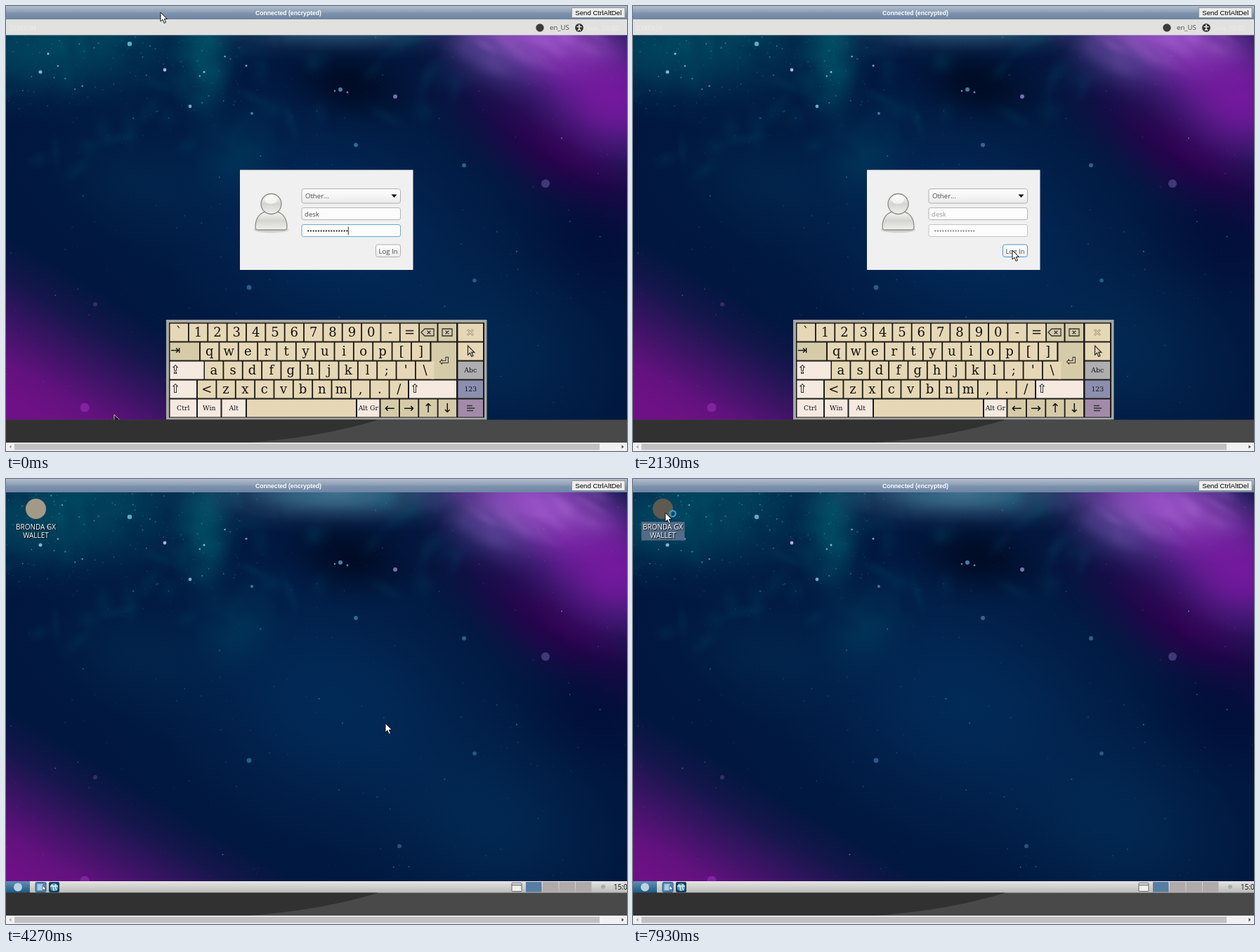
These frames come from a looping animation (884x634 px, 8 s). An HTML page with a canvas:

```html
<!DOCTYPE html>
<html lang="en">
<head>
<meta charset="utf-8">
<title>Remote desktop login</title>
<style>
  html, body { margin: 0; width: 100%; height: 100%; overflow: hidden; background: #313131; }
  canvas, svg { position: absolute; left: 0; top: 0; }
  text { font-family: "Open Sans", "Noto Sans", sans-serif; font-size: 9.6px; fill: #4a4a4a; white-space: pre; }
  .arial { font-family: "Liberation Sans", Arial, sans-serif; }
  .key { font-family: "DejaVu Serif", serif; text-anchor: middle; fill: #111; }
  .sym { font-family: "DejaVu Sans", sans-serif; }
  .label { font-size: 10px; fill: #fff; text-anchor: middle; text-shadow: 1px 1px 1px #000; }
  .mid { text-anchor: middle; }
</style>
</head>
<body>
<canvas id="sky" width="884" height="634"></canvas>
<svg id="stage" width="884" height="634" viewBox="0 0 884 634"></svg>
<script>
// Wallpaper
const g = document.getElementById('sky').getContext('2d');
let seed = 11;
const rnd = () => (seed = (seed * 16807) % 2147483647) / 2147483647;

function blob(x, y, rx, ry, turn, rgb, alpha) {
  g.save();
  g.translate(x, y);
  g.rotate(turn);
  g.scale(rx, ry);
  const fade = g.createRadialGradient(0, 0, 0, 0, 0, 1);
  [1, .8, .42, .12, 0].forEach((k, i) => fade.addColorStop(i / 4, `rgba(${rgb},${alpha * k})`));
  g.fillStyle = fade;
  g.fillRect(-1, -1, 2, 2);
  g.restore();
}

function dot(x, y, r, color) {
  g.fillStyle = color;
  g.beginPath();
  g.arc(x, y, r, 0, 7);
  g.fill();
}

function paintSky() {
  g.fillStyle = '#01173f';
  g.fillRect(0, 0, 884, 634);
  blob(470, 320, 380, 270, .4, '2,46,92', .85);
  blob(690, 490, 260, 190, .4, '2,46,88', .7);
  blob(190, 250, 190, 120, .3, '2,42,80', .6);
  blob(110, 30, 260, 150, 0, '0,84,104', .75);
  blob(20, 70, 160, 90, 0, '0,88,108', .4);
  blob(285, 70, 55, 130, 0, '0,100,116', .65);
  blob(330, 210, 80, 100, .6, '0,74,104', .4);
  blob(470, 20, 260, 60, 0, '90,150,175', .7);
  blob(490, 112, 130, 75, .2, '0,10,34', .9);
  blob(790, 215, 280, 95, .6, '44,0,78', .95);
  blob(840, 330, 150, 110, .6, '0,12,56', .7);
  blob(800, 85, 290, 130, .6, '112,30,158', .95);
  blob(870, 130, 130, 130, .6, '122,24,162', .85);
  blob(750, 30, 190, 85, .2, '166,92,212', .8);
  blob(690, 75, 110, 60, .3, '96,88,168', .45);

  const glow = g.createLinearGradient(200, 445, 100, 615);
  [[0, 0], [.25, .18], [.5, .5], [.8, .9], [1, 1]].forEach(([at, a]) =>
    glow.addColorStop(at, `rgba(110,17,134,${a})`));
  g.fillStyle = glow;
  g.fillRect(0, 300, 884, 334);

  // soft mottling of the clouds
  for (let i = 0; i < 90; i++) {
    const x = rnd() * 640, y = 20 + rnd() * 240 * (1 - x / 1300);
    blob(x, y, 15 + rnd() * 30, 10 + rnd() * 18, rnd() * 3, rnd() < .5 ? '0,110,130' : '0,16,52', .11);
  }
  for (let i = 0; i < 30; i++)
    blob(640 + rnd() * 210, 20 + rnd() * 65, 20 + rnd() * 30, 8 + rnd() * 15, .5, '190,130,225', .09);

  // star dust: dense and bright at the upper left, thin elsewhere
  for (let i = 0; i < 1000; i++) {
    const near = i < 330;
    const x = near ? rnd() * 340 : rnd() * 884;
    const y = near ? 20 + rnd() ** 1.4 * 140 : 20 + rnd() * 570;
    const a = near ? .15 + rnd() ** 3 * .7 : .08 + rnd() ** 3 * .4;
    dot(x, y, .35 + rnd() ** 4 * (near ? 1 : .8), `rgba(125,195,220,${a})`);
  }
  [[176, 54, 3.2, '#5badc0'], [226, 91, 2.4, '#b5aede'], [49, 94, 2.5, '#79b7cf'], [262, 143, 2.4, '#6fa9c6'],
   [350, 153, 2, '#417da0'], [476, 119, 3, '#427fa2'], [468, 121, 1.3, '#5c8dad'], [486, 123, 1.4, '#5c8dad'],
   [554, 129, 3, '#766fae'], [498, 198, 3, '#2d6990'], [768, 253, 6, '#403878'], [652, 227, 3, '#2a618a'],
   [667, 391, 2.8, '#245e88'], [346, 401, 3.4, '#245f88'], [560, 523, 3, '#1d5680'], [127, 425, 3, '#3e2a68'],
   [112, 572, 6.6, '#81229f'], [60, 68, 1.6, '#8bc5d5'], [342, 85, 1.6, '#63a3bb'], [282, 94, 1.5, '#80bfd0']
  ].forEach(s => dot(...s));
}

// Markup helpers
const rect = (x, y, w, h, fill, more = '') =>
  `<rect x="${x}" y="${y}" width="${w}" height="${h}" fill="${fill}" ${more}/>`;
const text = (x, y, s, more = '') => `<text x="${x}" y="${y}" ${more}>${s.replace(/</g, '&lt;')}</text>`;
const path = (d, more) => `<path d="${d}" ${more}/>`;
const disc = (x, y, r, fill, more = '') => `<circle cx="${x}" cy="${y}" r="${r}" fill="${fill}" ${more}/>`;
const group = (id, body) => `<g id="${id}">${body}</g>`;
const shade = (id, ...stops) => `<linearGradient id="${id}" x2="0" y2="1">` +
  stops.map(([at, c]) => `<stop offset="${at}" stop-color="${c}"/>`).join('') + '</linearGradient>';
const line = 'fill="none" stroke="#333" stroke-width="1.3"';
const arrow = 'M0 0V13L3 10.3L5.2 15.4L7.5 14.4L5.3 9.5H9.3Z';

const tan = '#e6d8b6', khaki = '#d6cba9', pale = '#f5e9e0';
const rows = [452.5, 479.5, 506.5, 533.5, 560.5];
const key = (x, row, w, fill, label = '', size = 18, cls = '', h = 25) =>
  rect(x, rows[row], w, h, fill) +
  text(x + w / 2, rows[row] + h / 2 + size * .36, label, `class="key ${cls}" style="font-size:${size}px"`);
const run = (x, row, chars) => [...chars].map((c, i) => key(x + i * 27.35, row, 25.5, tan, c)).join('');

function keyboard() {
  const cross = (x, y, r) => `M${x - r} ${y - r}l${2 * r} ${2 * r}m0 ${-2 * r}l${-2 * r} ${2 * r}`;
  return rect(228, 447, 456.5, 142.5, '#a6a8a2') + rect(232, 451, 449, 135.5, '#1d1b18') +
    run(233.5, 0, '`1234567890-=') + key(589, 0, 24.5, khaki) + key(615.5, 0, 25.5, khaki) +
    path('M591 465l5-5h13v10h-13z' + cross(602, 465, 2.3), line) +
    path('M621 460h14v10h-14z' + cross(628, 465, 2.3), line) +
    key(233.5, 1, 41.5, khaki) + text(234, 496, '⇥', 'class="sym" style="font-size:17px;fill:#111"') +
    run(277, 1, 'qwertyuiop[]') + key(605.5, 1, 35.5, khaki, '⏎', 17, 'sym', 52) +
    key(233.5, 2, 48, pale) + text(234, 524, '⇪', 'class="sym" style="font-size:17px;fill:#111"') +
    run(283, 2, "asdfghjkl;'\\") +
    key(233.5, 3, 37.5, pale) + text(234, 551, '⇧', 'class="sym" style="font-size:17px;fill:#111"') +
    run(273, 3, '<zxcvbnm,./') +
    key(574, 3, 67, pale) + text(575, 551, '⇧', 'class="sym" style="font-size:17px;fill:#111"') +
    key(233.5, 4, 37.5, pale, 'Ctrl', 9.3) + key(273, 4, 32.5, pale, 'Win', 9.3) +
    key(307.5, 4, 33.5, pale, 'Alt', 9.3) + key(343, 4, 155, tan) + key(500, 4, 31.5, pale, 'Alt Gr', 9.3) +
    [...'←→↑↓'].map((c, i) => key(533.5 + i * 27.35, 4, 25.5, khaki, c, 18, 'sym')).join('') +
    key(643.5, 0, 35.5, tan) + path(cross(661, 465, 4), 'stroke="#a1967e" stroke-width="3"') +
    path(cross(661, 465, 3.6), `stroke="${tan}" stroke-width="1.2"`) +
    key(643.5, 1, 35.5, tan) + path(arrow, `${line} transform="translate(657.5 484)"`) +
    key(643.5, 2, 35.5, '#aeaeb0', 'Abc', 9.3) + key(643.5, 3, 35.5, '#8c8eb0', '123', 9.3) +
    key(643.5, 4, 35.5, '#a18ba9') + path('M656 569.5h8m-8 3.5h11m-11 3.5h9', line);
}

function greeter() {
  const field = (y, h, more = '') => rect(421, y, 140.5, h, '#fcfcfc', `rx="2.5" stroke="#b4b4b4" ${more}`);
  const head = 'fill="url(#silver)" stroke="#8c8c88" stroke-width="1.3"';
  return rect(0, 19, 884, 22.5, '#e1e1df') +
    text(5, 35, 'STATION', 'style="fill:#ebebe9"') + text(826, 35, 'Sun, 15:02', 'style="fill:#ebebe9"') +
    disc(760, 31, 5.7, '#3c3c3c') + text(774, 34.3, 'en_US') + disc(816, 31, 5.9, '#333') +
    disc(816, 27.6, 1.2, '#fff') +
    path('M812.5 29.7h7M816 29.7v2.5l-2 3m2-3l2 3', 'fill="none" stroke="#fff" stroke-width="1.2"') +
    rect(333, 233.5, 246.5, 142.5, '#f0f0f0') +
    '<ellipse cx="377.5" cy="319" rx="25" ry="4" fill="#bdbdbd" opacity=".6"/>' +
    path('M355 315C355 300 363 292 377.500 292S400 300 400 315Q400 319 396 319H359Q355 319 355 315Z', head) +
    `<circle cx="377.500" cy="282" r="14.5" ${head}/>` +
    '<ellipse cx="377" cy="276" rx="9" ry="6" fill="#fff" opacity=".65"/>' +
    rect(421, 260.5, 140.5, 20.5, 'url(#btn)', 'rx="3" stroke="#b0b0b0"') + text(426, 274.2, 'Other...') +
    path('M548.500 268.500h8l-4 4.500z', 'fill="#111"') +
    field(287.500, 17) + group('pass', field(311.500, 17, 'id="passBox"')) +
    group('entry', text(425, 299.600, 'desk') +
      path('M430.300 320.500H486', 'stroke="#333" stroke-width="2.300" stroke-linecap="round" stroke-dasharray="0 3.670"')) +
    path('M487.300 314.500v11.500', 'id="caret" stroke="#222" stroke-width=".9"') +
    rect(526.500, 340, 35, 17.500, 'url(#btn)', 'id="login" rx="3" stroke="#b0b0b0"') +
    text(544, 352.600, 'Log In', 'class="mid"') + keyboard() +
    path(arrow, 'id="remote" fill="#111" stroke="#ddd" stroke-width=".8" transform="translate(154 582)"');
}

function taskbar() {
  const page = (x, fill) => rect(x, 574, 22.500, 14.500, fill);
  return rect(0, 573, 884, 17, 'url(#bar)') + rect(0, 573, 34, 17, 'url(#menu)') +
    disc(17, 581.500, 6, '#b9d3e3') +
    rect(42, 574.500, 15, 14, '#4f86b4', 'rx="1.5" stroke="#315f87"') + rect(44.500, 577, 8, 9, '#a5cbe8') +
    path('M52 579v7l1.700-1.400 1.200 2.400 1-.600-1-2.300h2z', 'fill="#fff" stroke="#222" stroke-width=".6"') +
    rect(61, 574, 15, 15, '#16425f', 'rx="2"') + disc(68.500, 581.500, 5.600, '#5c9cba') +
    path('M63 580h11M65 577.500l2 3 1 6M71 577l-1 4 2 5', 'fill="none" stroke="#e1f0f3" stroke-width="1.4"') +
    rect(720, 575.500, 14, 12, '#f0f0ee', 'rx="1" stroke="#666"') + path('M720 578.500h14', 'stroke="#777" stroke-width="1.5"') +
    page(740, '#587da3') + [764, 787.500, 811].map(x => page(x, '#b0aaaa')).join('') +
    disc(850, 581, 3, '#aaa') +
    text(865, 585.200, '15:02', 'style="font-size:10px;fill:#111"');
}

const launcher = group('pick', rect(12, 61, 61.500, 26.500, '#526c88')) +
  disc(42.500, 42.500, 14.500, '#a29a87', 'id="mark"') +
  text(42.500, 72.300, 'BRONDA GX', 'class="label"') + text(42.500, 84.300, 'WALLET', 'class="label"');

const tip = rect(54, 98, 110, 20, '#1b1b1b', 'rx="2"') +
  text(109, 111.500, 'BRONDA GX WALLET', 'class="mid" style="fill:#eee"');

const frame = rect(0, 0, 884, 19, 'url(#top)') +
  text(402, 13.400, 'Connected (encrypted)', 'class="arial mid" style="font-size:8.65px;font-weight:bold;fill:#fff"') +
  rect(805.500, 2.500, 75.500, 14, '#ededed', 'stroke="#989898"') +
  text(843.300, 13, 'Send CtrlAltDel', 'class="arial mid" style="font-size:9.7px;fill:#000"') +
  rect(0, 589.500, 884, 32.500, '#494949') +
  path('M0 589.500H530Q447 615 345 622H0Z', 'fill="#313131"') +
  rect(0, 622, 884, 12, '#f1f1f1') + rect(12, 623.500, 833, 9, '#c1c1c1') +
  path('M7.500 625.500v5l-3-2.500z', 'fill="#a3a3a3"') + path('M876.500 625.500v5l3-2.500z', 'fill="#444"');

paintSky();
document.getElementById('stage').innerHTML = '<defs>' +
  shade('top', [0, '#b2bdcd'], [.49, '#899cb3'], [.51, '#7e93af'], [1, '#6e84a3']) +
  shade('btn', [0, '#fff'], [1, '#ebebeb']) + shade('silver', [0, '#fbfbf9'], [.5, '#d4d4d0'], [1, '#efefec']) +
  shade('bar', [0, '#e4e4e2'], [1, '#b9bab8']) + shade('menu', [0, '#5f91b4'], [1, '#1d567f']) + '</defs>' +
  group('greeter', greeter()) + group('taskbar', taskbar()) + group('launcher', launcher) +
  group('tip', tip) + frame +
  group('cursor', path(arrow, 'fill="#fff" stroke="#111" stroke-width="1"') +
    disc(10.500, 1.300, 4.200, 'none', 'id="busy" stroke="#3a9ddb" stroke-width="2.2"'));

// Pointer way points: [step, x, y]
const way = [[1, 220, 9], [4, 330, 100], [8, 490, 285], [11, 546, 390], [14, 506, 427], [17, 524, 402],
  [21, 560, 356], [23, 566, 350], [27, 540, 346], [28, 540, 348], [86, 540, 348], [88, 490, 318],
  [92, 225, 165], [96, 66, 67], [98, 43, 49], [100, 46, 48], [120, 46, 48]];

function pointer(step) {
  const n = way.findIndex(p => p[0] >= step);
  if (n < 1) return way[0].slice(1);
  const [a, b] = [way[n - 1], way[n]];
  const k = (step - a[0]) / (b[0] - a[0]);
  return [1, 2].map(i => Math.round(a[i] + (b[i] - a[i]) * k));
}

const el = id => document.getElementById(id);
const show = (id, on) => { el(id).style.display = on ? '' : 'none'; };

function draw() {
  const t = performance.now() % 8000;
  const between = (a, b) => t >= a && t < b;
  const pressed = t >= 2070, locked = t >= 2130, picked = t >= 7870;
  show('greeter', t < 2400);
  show('remote', t < 130);
  show('caret', !pressed);
  el('passBox').setAttribute('stroke', pressed ? '#c4c4c4' : '#6fa8cf');
  el('login').setAttribute('stroke', pressed ? '#4d97c8' : '#b0b0b0');
  el('entry').style.opacity = locked ? .55 : 1;
  show('taskbar', t >= 3600);
  show('launcher', t >= 4270);
  show('pick', picked);
  el('mark').setAttribute('fill', picked ? '#5f5a50' : '#a29a87');
  show('tip', between(7330, 7870));
  show('busy', between(2670, 3270) || t >= 7670);
  el('cursor').setAttribute('transform', `translate(${pointer(Math.floor(t * 15 / 1000 + .1))})`);
  requestAnimationFrame(draw);
}
draw();
</script>
</body>
</html>
```
